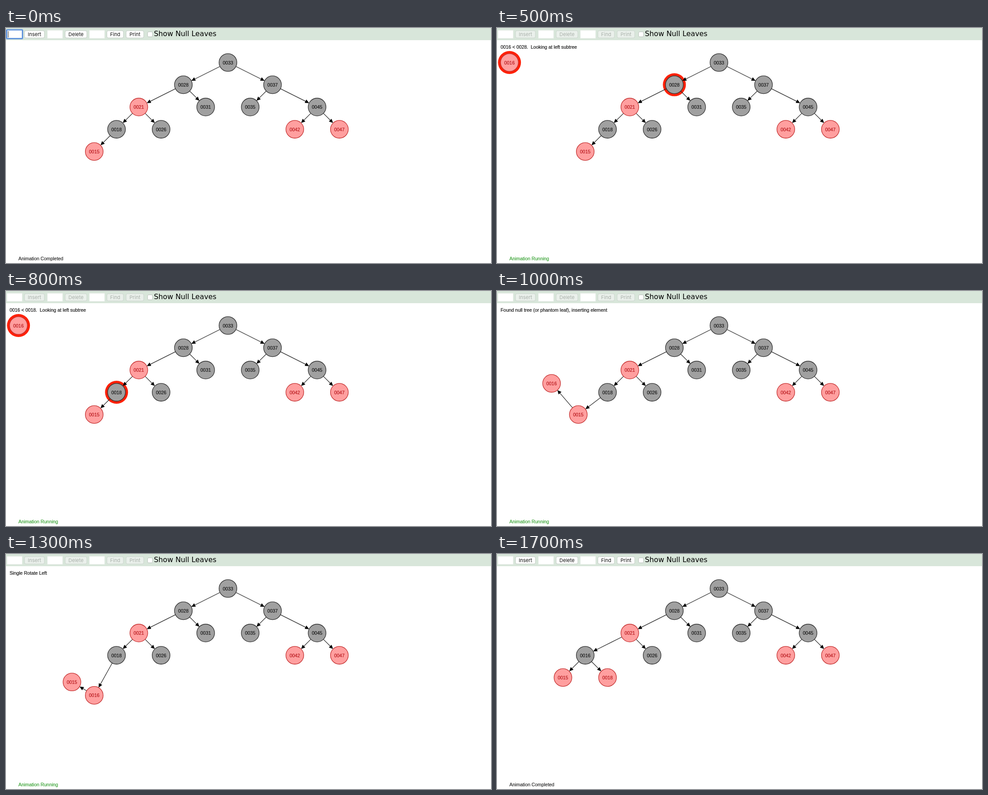
An HTML page for the animation above (2000 ms loop, 1074x521 px).

```html
<!DOCTYPE html>
<html lang="en">
<head>
<meta charset="utf-8">
<title>Tree insertion</title>
<style>
html, body { margin: 0; width: 100%; height: 100%; overflow: hidden; background: #fff; }
svg { display: block; }
text { white-space: pre; }
.small { font: 10.4px "Liberation Sans", Arial, sans-serif; stroke-width: .2; }
.button { font: 11px Inter, "Liberation Sans", sans-serif; text-anchor: middle; }
.label { font: 15.8px "DejaVu Sans", Verdana, sans-serif; }
</style>
</head>
<body>
<svg id="stage" width="1074" height="521" viewBox="0 0 1074 521"></svg>
<script>
const LOOP = 2000, TICK = 100, GAP = 49.35, R = 19.7;
const BLACK = { fill: '#a0a0a0', line: '#303030', text: '#151515' };
const RED = { fill: '#ff9f9f', line: '#c42f2f', text: '#b5161b' };
const stage = document.getElementById('stage');

// Grid places: column from the root, then row.
const base = {
  33: [0, 0], 28: [-2, 1], 37: [2, 1], 21: [-4, 2], 31: [-1, 2], 35: [1, 2],
  45: [4, 2], 18: [-5, 3], 26: [-3, 3], 42: [3, 3], 47: [5, 3], 15: [-6, 4]
};
const waiting = { 16: [-9.4, 0] };
const links = [[33, 28], [33, 37], [28, 21], [28, 31], [37, 35], [37, 45],
  [21, 26], [45, 42], [45, 47]];
const chain = [[21, 18], [18, 15]];
const chainRight = [...chain, [15, 16]];
const chainLeft = [[21, 18], [18, 16], [16, 15]];
const rotated = [[21, 16], [16, 15], [16, 18]];
const redNodes = [21, 42, 47, 15, 16];

const name = n => String(n).padStart(4, '0');
const mix = (a, b, p) => a.map((v, i) => v + (b[i] - v) * p);
const px = ([c, r]) => [491.5 + c * GAP, 76.5 + r * GAP];
const fix = v => v.toFixed(2);

const look = (n, dir = '<') =>
  `0016 ${dir} ${name(n)}.  Looking at ${dir === '<' ? 'left' : 'right'} subtree`;
const compare = (n, dir, ring = 25.5) =>
  ({ msg: look(n, dir), at: waiting, edges: chain, rings: [n, 16], ring });
const descend = (a, b) =>
  ({ msg: look(a), at: waiting, edges: chain, halo: mix(base[a], base[b], 1 / 3) });
const inserted = { 15: [-7, 4], 16: [-6, 5] };
const leaning = { 15: [-7, 5], 16: [-6, 4] };
const bothRed = side => 'Node and parent are both red.  Node is ' + side + ' child, parent is left child';
const spin = (from, to, p) =>
  Object.fromEntries(Object.keys(to).map(n => [n, mix(from[n] || base[n], to[n], p)]));
const balanced = { 15: [-7, 4], 16: [-6, 3], 18: [-5, 4] };

const steps = [
  { idle: true, focus: true, edges: chain },
  { idle: true, focus: true, typed: '16', edges: chain },
  { msg: 'Inserting 0016', at: waiting, edges: chain },
  compare(33, '<', 26.2),
  descend(33, 28),
  compare(28, '<'),
  compare(21, '<'),
  descend(21, 18),
  compare(18, '<'),
  compare(15, '>='),
  { msg: 'Found null tree (or phantom leaf), inserting element',
    at: { 15: [-6.31, 4], 16: [-7.51, 2.6] }, edges: chainRight },
  { msg: bothRed('right') + ' -- rotate', at: inserted, edges: chainRight },
  { msg: bothRed('right') + ' -- rotate', at: inserted, edges: chainRight },
  { msg: 'Single Rotate Left', at: spin(inserted, leaning, .2), edges: chainLeft },
  { msg: bothRed('left'), note: 'Can fix extra redness with a single rotation',
    at: leaning, edges: chainLeft },
  { msg: 'Single Rotate Right', at: leaning, edges: chainLeft, hot: 18 },
  { msg: 'Single Rotate Right', at: spin(leaning, balanced, .5), edges: rotated },
  { idle: true, at: balanced, edges: rotated, reds: [21, 42, 47, 15, 18] }
];

function text(x, y, str, color, kind = 'small', extra = '') {
  const safe = str.replace(/</g, '&lt;').replace(/>/g, '&gt;');
  const stroke = kind === 'small' ? ` stroke="${color}"` : '';
  return `<text class="${kind}" x="${fix(x)}" y="${y.toFixed(2)}" fill="${color}"${stroke} ${extra}>${safe}</text>`;
}

function box(x, y, w, h, r, fill, line) {
  return `<rect x="${x}" y="${y}" width="${w}" height="${h}" rx="${r}" fill="${fill}" stroke="${line}"/>`;
}

function circle([x, y], r, fill, line = 'none', width = 1.3) {
  return `<circle cx="${fix(x)}" cy="${fix(y)}" r="${r}" fill="${fill}" stroke="${line}" stroke-width="${width}"/>`;
}

function edge(a, b, hot) {
  const len = Math.hypot(b[0] - a[0], b[1] - a[1]);
  const ux = (b[0] - a[0]) / len, uy = (b[1] - a[1]) / len;
  const on = (p, d, side = 0) => `${fix(p[0] + ux * d - uy * side)} ${fix(p[1] + uy * d + ux * side)}`;
  const line = `M${on(a, R)}L${on(b, -R - 4)}`;
  const head = `M${on(b, -R)}L${on(b, -R - 9, 4.2)}L${on(b, -R - 9, -4.2)}Z`;
  const glow = hot
    ? `<path d="${line}" stroke="#e0200c" stroke-width="4"/><path d="${head}" fill="#e0200c" stroke="#e0200c" stroke-width="2"/>` : '';
  return `${glow}<path d="${line}" stroke="#222" stroke-width="1.2"/><path d="${head}" fill="#000"/>`;
}

function toolbar(s) {
  const ink = s.idle ? '#111' : '#a9b0aa';
  const face = s.idle ? '#fff' : '#eaf0eb';
  const rim = s.idle ? '#c3cbc5' : '#cbd4cd';
  let out = '<rect width="1074" height="27" fill="#d8e6da"/>';
  for (const x of [2, 91.5, 184.5]) out += box(x, 5, 34, 18, 0, '#fff', '#e3eae4');
  if (s.focus) {
    out += '<rect x="1.5" y="4" width="35" height="19.5" rx="1.5" fill="#fff" stroke="#6496dc" stroke-width="3"/>';
    if (s.typed) out += text(5, 18, s.typed, '#111', 'button', 'style="text-anchor:start"');
    out += `<rect x="${s.typed ? 18 : 4.5}" y="7" width="1" height="14" fill="#222"/>`;
  }
  for (const [x, w, str] of [[41, 44, 'Insert'], [131, 48, 'Delete'], [223.5, 36.5, 'Find'], [266, 39, 'Print']])
    out += box(x, 6, w, 16, 3, face, rim) + text(x + w / 2, 18, str, ink, 'button');
  return out + box(313.5, 8.5, 11, 11, 2.5, '#fff', '#bcc4be') + text(327.5, 18, 'Show Null Leaves', '#000', 'label');
}

function draw(s) {
  const nodes = { ...base, ...s.at };
  const reds = s.reds || redNodes;
  let out = toolbar(s);
  if (s.msg) out += text(8, 46.2, s.msg, '#151515');
  if (s.note) out += text(8, 58, s.note, '#151515');
  for (const n of s.rings || []) out += circle(px(nodes[n]), s.ring, '#ff2108');
  for (const [a, b] of [...links, ...s.edges]) out += edge(px(nodes[a]), px(nodes[b]), s.hot === a);
  for (const n in nodes) {
    const p = px(nodes[n]), look = reds.includes(+n) ? RED : BLACK;
    out += circle(p, R, look.fill, look.line) +
      text(p[0], p[1] + 4, name(n), look.text, 'small', 'text-anchor="middle"');
  }
  if (s.halo) out += circle(px(s.halo), 20, 'none', '#007700', 4);
  out += s.idle ? text(27.5, 514.7, 'Animation Completed', '#262626')
    : text(27.5, 514.7, 'Animation Running', '#34a02f');
  stage.innerHTML = out;
}

const start = performance.now();
let shown = -1;
function tick() {
  const t = (performance.now() - start) % LOOP;
  const i = Math.min(Math.floor(t / TICK), steps.length - 1);
  if (i !== shown) draw(steps[shown = i]);
  requestAnimationFrame(tick);
}
tick();
</script>
</body>
</html>
```
